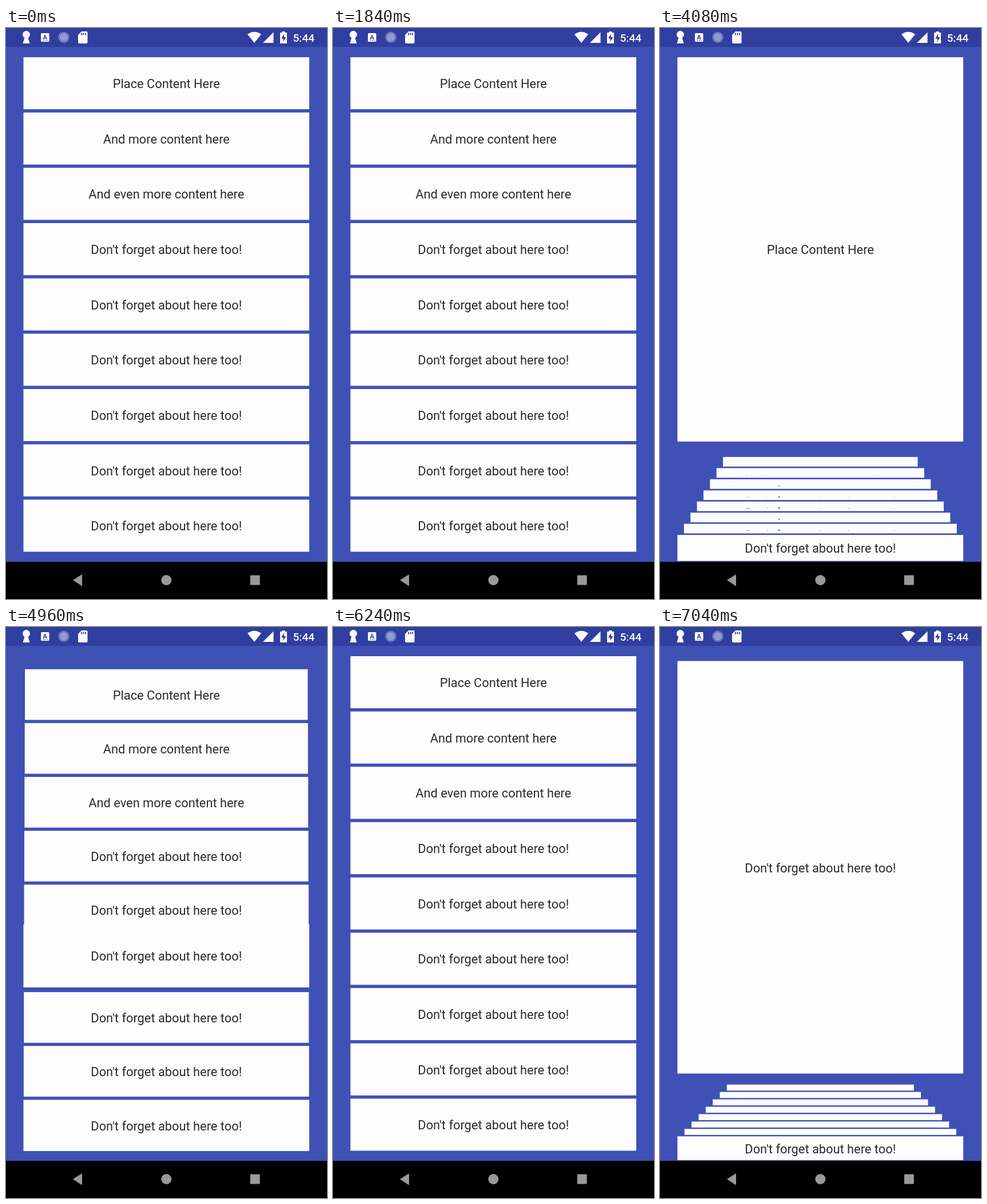
Write an HTML page with a canvas that moves like this. It is 561x998 px and loops after 8 s.

```html
<!DOCTYPE html>
<html lang="en">
<head>
<meta charset="utf-8">
<title>Expanding card stack</title>
<style>
  html, body { margin: 0; width: 100%; height: 100%; overflow: hidden; background: #3f51b5; }
  canvas { display: block; width: 561px; height: 998px; }
</style>
</head>
<body>
<canvas id="stage" width="561" height="998"></canvas>
<script>
const ctx = document.getElementById('stage').getContext('2d');
const LOOP = 8000, STEP = 40, LAST_MOVE_END = 7040;
const LEFT = 30.5, WIDTH = 499.5, TOP = 51, FONT = 21.82, PAD = 4.8;
const BLUE = '#3f51b5', DARK_BLUE = '#303f9f', WHITE = '#fdfdfd';

const labels = ['Place Content Here', 'And more content here', 'And even more content here',
  ...Array(6).fill("Don't forget about here too!")];

// Each move opens or closes one card.
const moves = [
  { start: 2570, length: 230, card: 0, open: true },
  { start: 4042, length: 198, card: 0, open: false },
  { start: 4930, length: 270, card: 5, open: true },
  { start: 6010, length: 230, card: 5, open: false },
  { start: 6760, length: 300, card: 8, open: true },
];

const mix = (a, b, p) => a + (b - a) * p;
const ease = u => (1 - Math.cos(Math.PI * Math.min(1, u))) / 2;

function fill(color, path) {
  ctx.fillStyle = color;
  ctx.fill(new Path2D(path));
}

function rect(color, x, y, w, h) {
  ctx.fillStyle = color;
  ctx.fillRect(x, y, w, h);
}

function disc(color, x, y, r) {
  ctx.fillStyle = color;
  ctx.beginPath();
  ctx.arc(x, y, r, 0, 7);
  ctx.fill();
}

function text(string, x, y, size, color, align, weight = 400) {
  ctx.font = `${weight} ${size}px Roboto, sans-serif`;
  ctx.textAlign = align;
  ctx.fillStyle = color;
  ctx.fillText(string, x, y);
}

// Box of a card when another one, or the card itself, is fully open.
function openBox(i, card) {
  if (i === card) return { y: TOP, h: 728, inset: 0 };
  const slot = i < card ? i : i - 1;
  return { y: 808 + 12 * slot, h: slot === 7 ? 41 : 9.6, inset: 12.47 * (7 - slot) };
}

function drawCard(i, card, p) {
  const box = openBox(i, card);
  const y = mix(TOP + 96.67 * i, box.y, p), h = mix(91, box.h, p), inset = box.inset * p;
  rect(WHITE, LEFT + inset, y, WIDTH - 2 * inset, h);
  if (h <= 2 * PAD) return;

  // Text is centred, or top-aligned and cut off when the card is too low.
  const lineTop = Math.max(PAD, (h - 1.327 * FONT) / 2);
  ctx.save();
  ctx.beginPath();
  ctx.rect(LEFT, y + PAD, WIDTH, h - 2 * PAD);
  ctx.clip();
  text(labels[i], 280.3, y + lineTop + 1.056 * FONT, FONT, '#2b2b2e', 'center');
  ctx.restore();
}

function drawStatusBar() {
  rect(DARK_BLUE, 0, 0, 561, 33);
  disc('#fff', 35.5, 11.5, 6.5);
  fill('#fff', 'M33 15h5l3.5 12h-12z');

  fill('#fff', 'M62.500 9h11.500q1.500 0 1.500 1.500v12q0 1.500-1.500 1.500h-11.500q-1.500 0-1.500-1.500v-12q0-1.500 1.500-1.500z');
  text('A', 68.2, 19.5, 11.5, DARK_BLUE, 'center', 700);
  for (const x of [65, 68, 71]) rect(DARK_BLUE, x, 21, 1.5, 1.3);

  disc('#8f9bd3', 101, 16.3, 7.5);
  for (let k = 0; k < 24; k++) {
    const a = k * Math.PI / 12;
    disc('#c3caea', 101 + 8.8 * Math.cos(a), 16.3 + 8.8 * Math.sin(a), 0.8);
  }

  fill('#fff', 'M132 6h8.500q2 0 2 2v17q0 2-2 2h-12.500q-2 0-2-2v-13z');
  for (const x of [131, 134.5, 138]) rect(DARK_BLUE, x, 8.5, 1.8, 4);

  fill('#fff', 'M434 26l-12-15q12-8.500 24 0z');
  fill('#fff', 'M467.500 7.500v18.500h-18.500z');
  fill('#fff', 'M482.500 8v-2h5v2h3.500v19h-12v-19z');
  fill(DARK_BLUE, 'M486 10.500l-5 8h3.500v5.500l5-8h-3.500z');
  text('5:44', 501.5, 24, 19.1, '#fff', 'left', 500);
}

function drawNavBar() {
  rect('#000', 0, 933, 561, 65);
  fill('#999', 'M117 965l14.500-9.300q1.500-.8 1.500 1v17q0 1.800-1.500 1z');
  disc('#999', 280.3, 965, 9);
  fill('#999', 'M428 956.500h14.500q1.200 0 1.200 1.200v14.600q0 1.200-1.200 1.200h-14.500q-1.200 0-1.200-1.200v-14.600q0-1.200 1.200-1.200z');
}

function draw(now) {
  const time = Math.min(Math.floor(now % LOOP / STEP) * STEP, LAST_MOVE_END);
  const move = moves.filter(m => m.start <= time).pop();
  let p = 0;
  if (move) {
    const done = ease((time - move.start) / move.length);
    p = move.open ? done : 1 - done;
  }
  rect(BLUE, 0, 0, 561, 998);
  labels.forEach((_, i) => drawCard(i, move ? move.card : 0, p));
  drawStatusBar();
  drawNavBar();
}

const begin = performance.now();
function tick() {
  draw(performance.now() - begin);
  requestAnimationFrame(tick);
}
tick();
</script>
</body>
</html>
```
